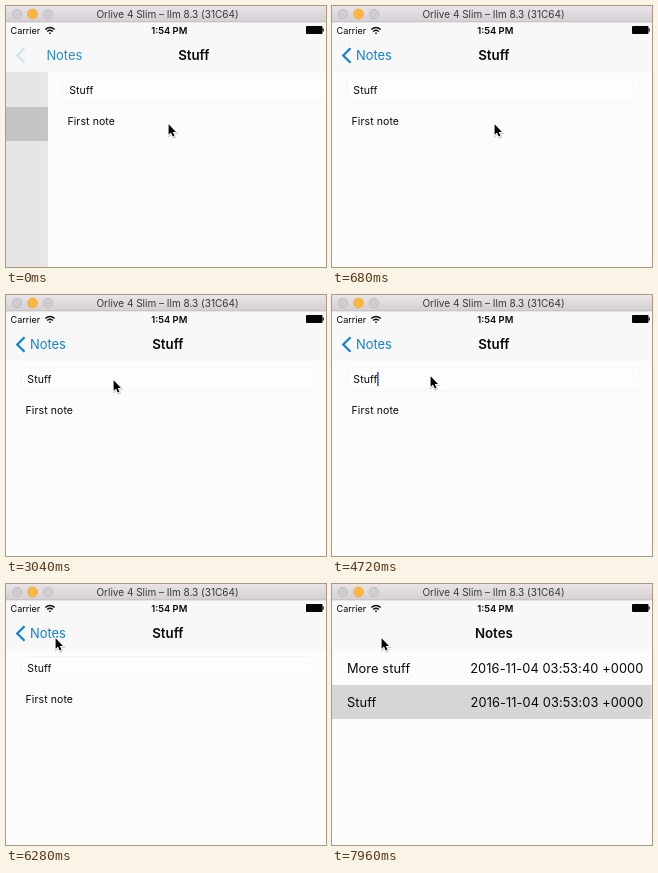
An HTML page for the animation above (8000 ms loop, 320 by 261 pixels).

```html
<!DOCTYPE html>
<html lang="en">
<head>
<meta charset="utf-8">
<title>Notes</title>
<style>
  html, body { margin: 0; width: 100%; height: 100%; overflow: hidden; background: #fcfcfc; }
  svg { display: block; width: 100%; height: 100%; }
  text { font-family: Inter, Roboto, sans-serif; font-size: 10.5px; letter-spacing: .1px; fill: #080808; }
  .window { font-size: 10px; letter-spacing: 0; fill: #383838; }
  .status { font-size: 9.1px; letter-spacing: 0; }
  .clock { font-size: 9.4px; }
  .nav { font-size: 13.3px; letter-spacing: 0; }
  .bold { font-weight: 600; }
  .cell { font-size: 12.8px; }
  .blue { font-size: 12.9px; fill: #0f80d8; }
</style>
</head>
<body>
<svg viewBox="0 0 320 261" preserveAspectRatio="none">
  <defs>
    <linearGradient id="chrome" x2="0" y2="1">
      <stop stop-color="#e8e4e8"/>
      <stop offset="1" stop-color="#d3cfd3"/>
    </linearGradient>
  </defs>
  <rect width="320" height="261" fill="#fcfcfc"/>

  <g id="list">
    <rect y="101" width="320" height="34" fill="#d6d6d6"/>
    <text class="cell" x="15" y="89">More stuff</text>
    <text class="cell" x="311.500" y="89" text-anchor="end">2016-11-04 03:53:40 +0000</text>
    <text class="cell" x="15" y="123">Stuff</text>
    <text class="cell" x="311.500" y="123" text-anchor="end">2016-11-04 03:53:03 +0000</text>
  </g>
  <rect id="dim" y="66" width="320" height="195"/>

  <g id="detail">
    <rect y="66" width="320" height="195" fill="#fcfcfc"/>
    <rect x="15" y="72.500" width="293" height="23.500" rx="4" fill="#fdfdfd" stroke="#f7f7f7"/>
    <text x="21.300" y="88">Stuff</text>
    <rect id="caret" x="45" y="77" width="1.700" height="14" fill="#3f66dc"/>
    <text x="19.500" y="119">First note</text>
  </g>

  <rect y="16" width="320" height="50" fill="#f8f8f8"/>
  <path id="chevron" d="M18.500 42.300 11.200 49.500l7.300 7.200" fill="none" stroke="#0f80d8" stroke-width="2.200"/>
  <text id="back" class="nav blue" x="24" y="54">Notes</text>
  <text id="title" class="nav bold" x="146.200" y="54">Stuff</text>
  <text id="home" class="nav bold" x="162" y="54" text-anchor="middle">Notes</text>

  <text class="status" x="4.500" y="28">Carrier</text>
  <g fill="none" stroke="#111" stroke-width="1.500">
    <path d="M39.300 23.500q4.700-4 9.400 0M41.200 25.500q2.800-2.400 5.600 0"/>
    <path d="M43.200 27.200h1.600"/>
  </g>
  <text class="status clock bold" x="163.300" y="28" text-anchor="middle">1:54 PM</text>
  <rect x="300" y="20" width="16.500" height="8" rx="1" fill="#050505"/>
  <rect x="316.500" y="22.500" width="1.300" height="3" fill="#111"/>

  <rect width="320" height="16" fill="url(#chrome)"/>
  <rect y="15.500" width="320" height=".8" fill="#bdbbbd"/>
  <g stroke-width=".7">
    <circle cx="11" cy="8" r="4.700" fill="#cfcdcf" stroke="#b9b7b9"/>
    <circle cx="26.500" cy="8" r="5" fill="#fbb541" stroke="#eeab42"/>
    <circle cx="42" cy="8" r="4.700" fill="#cfcdcf" stroke="#b9b7b9"/>
  </g>
  <text class="window" x="161.500" y="11.800" text-anchor="middle">Orlive 4 Slim – Ilm 8.3 (31C64)</text>

  <g id="pointer">
    <circle id="ring" cx=".5" cy="2" r="17" fill="none" stroke="#222" stroke-width="2"/>
    <g transform="translate(.6 1.300) scale(.92)">
      <path id="arrow" d="M0 0v11.300l2.600-2.300 1.900 4.300 1.900-.8-1.900-4.200h3.500z" transform="translate(.5 1)" stroke="#000" stroke-width="2" opacity=".22"/>
      <path d="M0 0v11.300l2.600-2.300 1.900 4.300 1.900-.8-1.900-4.200h3.500z" fill="#000" stroke="#fff" stroke-width="1.700" paint-order="stroke"/>
    </g>
  </g>
</svg>
<script>
const LOOP = 8000, POP = 7480;
const PATH = [ // time, x, y of the pointer tip
  [2340, 162, 117], [2720, 21, 46], [3040, 107, 84], [3160, 98, 80],
  [4720, 98, 80], [5120, 13, 50], [5520, 50, 54], [5840, 77, 66], [6280, 49, 53]
];
const CLICKS = [3200, 6480];
const el = {};
document.querySelectorAll('svg [id]').forEach(n => el[n.id] = n);

const ramp = (t, a, b) => Math.min(1, Math.max(0, (t - a) / (b - a)));
const smooth = k => k * k * (3 - 2 * k);
const decay = (t, tau) => Math.exp(-Math.max(0, t) / tau);
const move = (n, x, y = 0) => n.setAttribute('transform', `translate(${x.toFixed(2)} ${y.toFixed(2)})`);
const fade = (n, a) => n.setAttribute('opacity', a.toFixed(3));

function pointerAt(t) {
  let [, x, y] = PATH[0];
  for (let i = 1; i < PATH.length; i++) {
    const k = smooth(ramp(t, PATH[i - 1][0], PATH[i][0]));
    x += (PATH[i][1] - PATH[i - 1][1]) * k;
    y += (PATH[i][2] - PATH[i - 1][2]) * k;
  }
  return [x, y];
}

function caretAt(t) {
  if (t < 4080 || t >= POP) return 0;
  const p = (t - 4080) % 1200;
  return ramp(p, -40, 80) * (1 - ramp(p, 650, 740));
}

function ringAt(t) {
  return Math.max(...CLICKS.map(c => t < c ? 0 : 0.6 * (1 - ramp(t, c + 80, c + 220))));
}

function draw(t) {
  const popped = t >= POP;
  const push = decay(t - 60, 125);
  const pop = decay(t - POP - 60, 110);
  // share of the stage by which the detail page is shifted right
  const shift = popped ? 1 - 0.047 * pop : push < 0.012 ? 0 : 0.131 * push;

  move(el.detail, 320 * shift);
  move(el.list, -96 * (1 - shift));
  fade(el.dim, 0.1 * (1 - shift));

  move(el.title, (popped ? 177 : 198) * shift);
  fade(el.title, popped ? 0.08 * pop : 1);
  move(el.back, 125 * shift);
  move(el.home, -125 * (1 - shift));
  fade(el.home, popped ? 1 - 0.76 * pop : 0);

  const press = ramp(t, 6460, 6520) * (1 - ramp(t, 6560, 6760));
  fade(el.back, popped ? 0 : (1 - 0.1 * push) * (1 - 0.6 * press));
  fade(el.chevron, popped ? 0 : (1 - 0.82 * push) * (1 - 0.6 * press));

  fade(el.caret, caretAt(t));
  fade(el.ring, ringAt(t));
  move(el.pointer, ...pointerAt(t));
}

function tick() {
  draw(performance.now() % LOOP);
  requestAnimationFrame(tick);
}
tick();
</script>
</body>
</html>
```
